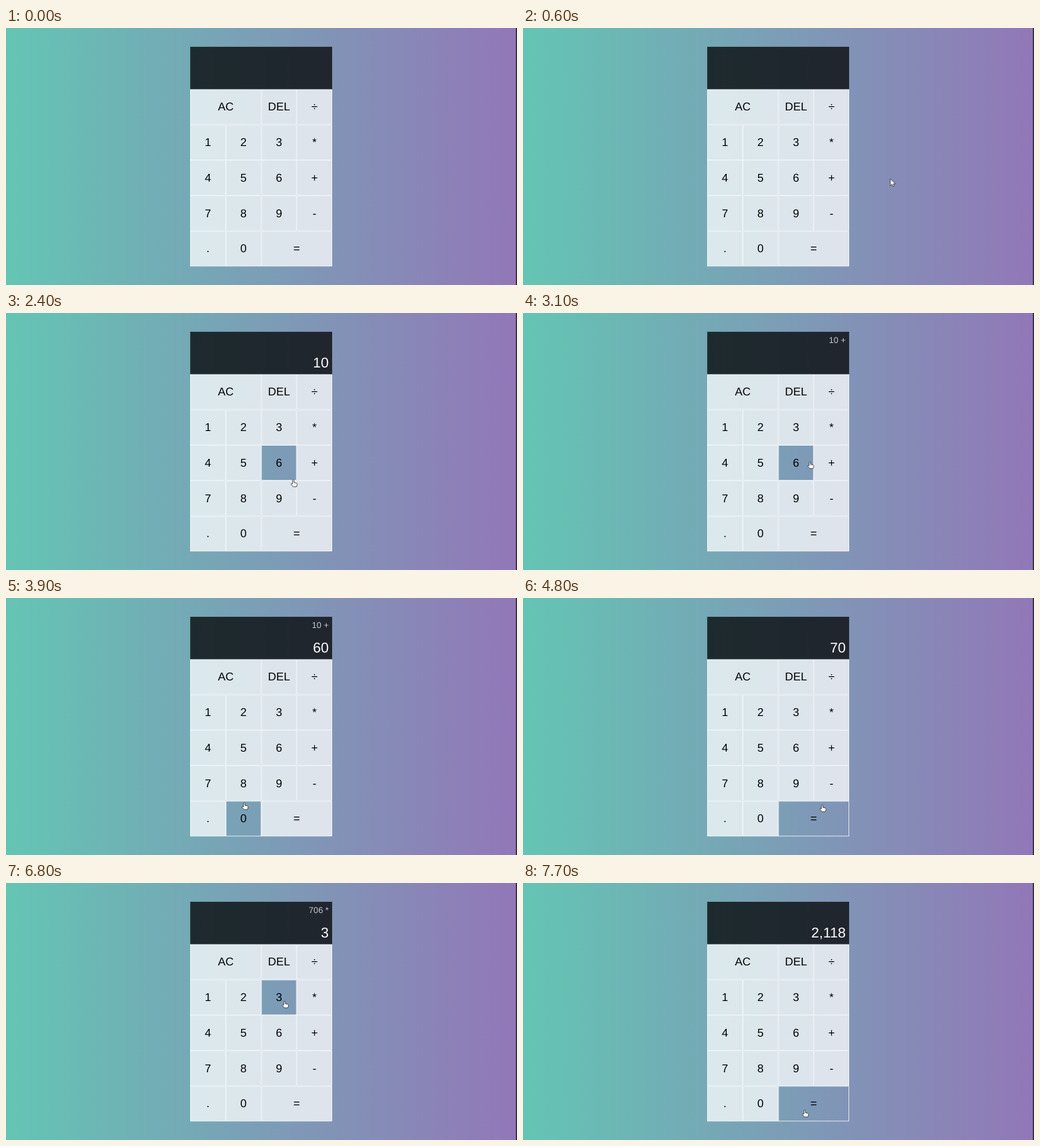
An HTML page that plays this animation: 730x368 px, repeating every 8 s.

```html
<!DOCTYPE html>
<html lang="en">
<head>
<meta charset="utf-8">
<title>Calculator</title>
<style>
  html, body { margin: 0; width: 100%; height: 100%; overflow: hidden; }
  body { background: linear-gradient(to right, #64c5b4, #9277b8); }
  svg { display: block; width: 730px; height: 368px; font-family: "Liberation Sans", Arial, sans-serif; }
  text { text-rendering: geometricPrecision; }
  .key rect { fill: rgba(255, 255, 255, .74); stroke: #fff; stroke-width: .75; }
  .key.hover rect { fill: transparent; }
  .key text { font-size: 16.2px; text-anchor: middle; }
  .display { fill: #fff; text-anchor: end; }
  #previous { font-size: 12.16px; fill-opacity: .75; }
  #current { font-size: 20.27px; }
  #pointer path { fill: #fff; stroke: #333; stroke-width: .8; stroke-linejoin: round; }
</style>
</head>
<body>
<svg viewBox="0 0 730 368">
  <rect x="728.5" width="1.5" height="368" fill="#25222c"/>
  <rect x="263.2" y="26.9" width="202.7" height="60.9" fill="rgba(0,0,0,.75)"/>
  <g class="display">
    <text id="previous" x="461" y="43.2"></text>
    <text id="current" x="461" y="78.2"></text>
  </g>
  <g id="keys"></g>
  <g id="pointer">
    <path id="hand" d="M-1 .7Q0-.6 1 .7V4L4.8 4.8Q6 5.2 5.6 7L4.6 10H-.2L-3.2 6.4Q-3.4 4.8-1 6Z"/>
    <path id="arrow" d="M0 0V10L2.4 7.8L4 11L5.6 10.2L4.1 7.2H7.2Z"/>
  </g>
</svg>
<script>
const LOOP = 8000, FRAME = 100, TRAVEL = 600;
const LEFT = 263.2, TOP = 87.8, CELL = 50.7;
const $ = id => document.getElementById(id);

function add(parent, tag, attrs) {
  const el = document.createElementNS("http://www.w3.org/2000/svg", tag);
  for (const name in attrs) el.setAttribute(name, attrs[name]);
  return parent.appendChild(el);
}

// A repeated label makes one wide key
const rows = ["AC AC DEL ÷", "1 2 3 *", "4 5 6 +", "7 8 9 -", ". 0 = ="];
const keys = rows.flatMap((row, r) => {
  const labels = row.split(" ");
  return [...new Set(labels)].map(label => {
    const width = labels.filter(l => l === label).length * CELL;
    const x = LEFT + labels.indexOf(label) * CELL, y = TOP + r * CELL;
    const el = add($("keys"), "g", { class: "key" });
    add(el, "rect", { x: x + .37, y: y + .37, width: width - .75, height: CELL - .75 });
    add(el, "text", { x: x + width / 2, y: y + 30.6 }).textContent = label;
    return { el, label, x, y, width };
  });
});

// Time, key, and where the pointer tip rests relative to the key's centre
const presses = [
  [1500, "1", 16, 8], [2100, "0", 3, -4], [2900, "+", -2, -6],
  [3300, "6", 8, 0], [3900, "0", 1, -23], [4800, "=", 12, -20],
  [5500, "6", 8, 0], [6200, "*", 14, 5], [6800, "3", 8, 5], [7700, "=", -13, 9]
].map(([time, label, dx, dy]) => {
  const key = keys.find(k => k.label === label);
  return { time, label, x: key.x + key.width / 2 + dx, y: key.y + CELL / 2 + dy };
});
const stops = [{ time: 400, x: 745, y: 260 }, ...presses];

// The pointer leaves on each press and slows down towards the next key
function pointerAt(t) {
  const i = Math.max(0, stops.findLastIndex(s => s.time <= t));
  const from = stops[i], to = stops[i + 1] || from;
  const k = Math.min(1, Math.max(0, t - from.time) / Math.min(TRAVEL, to.time - from.time || TRAVEL));
  const ease = Math.sin(k * Math.PI / 2);
  return [from.x + (to.x - from.x) * ease, from.y + (to.y - from.y) * ease];
}

function press({ previous, current }, { label }) {
  if (label === "=") {
    const [left, operator] = previous.split(" ");
    const result = operator === "+" ? +left + +current : left * current;
    return { previous: "", current: `${result}` };
  }
  if ("+*".includes(label)) return { previous: `${current} ${label}`, current: "" };
  return { previous, current: current + label };
}

function draw(now) {
  const t = Math.floor(now % LOOP / FRAME) * FRAME;
  const [x, y] = pointerAt(t);
  let over = false;
  for (const key of keys) {
    const hit = x >= key.x && x < key.x + key.width && y >= key.y && y < key.y + CELL;
    key.el.classList.toggle("hover", hit);
    over ||= hit;
  }
  $("pointer").setAttribute("transform", `translate(${x} ${y})`);
  $("hand").style.display = over ? "" : "none";
  $("arrow").style.display = over ? "none" : "";

  const { previous, current } = presses.filter(p => p.time <= t).reduce(press, { previous: "", current: "" });
  $("previous").textContent = previous;
  $("current").textContent = current && Number(current).toLocaleString("en");
}

const start = performance.now();
function tick() {
  draw(performance.now() - start);
  requestAnimationFrame(tick);
}
tick();
</script>
</body>
</html>
```
